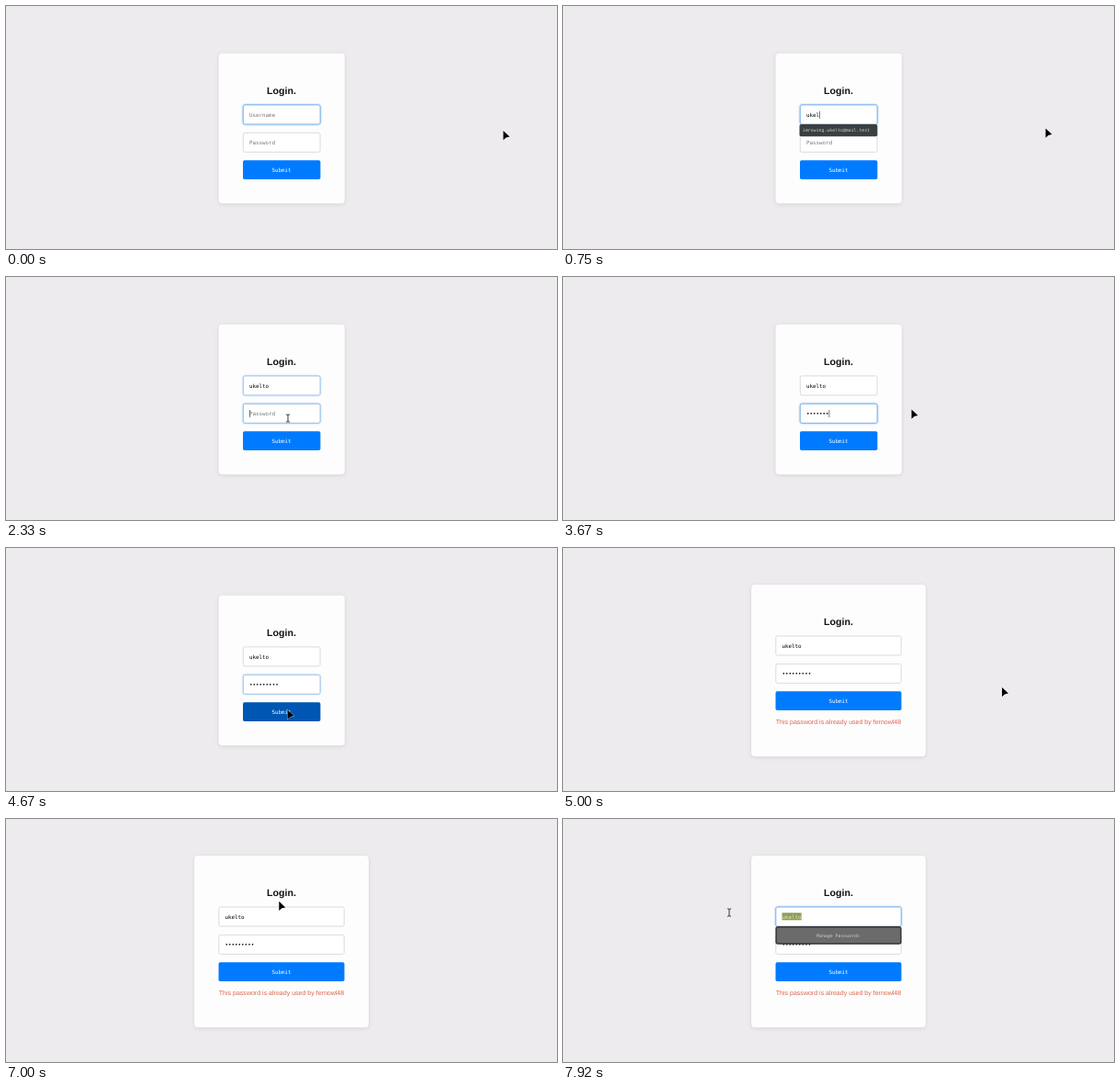
An HTML page for the animation above (8000 ms loop, 600 px wide and 265 px high).

```html
<!DOCTYPE html>
<html lang="en">
<head>
<meta charset="utf-8">
<title>Login</title>
<style>
  html, body { margin: 0; width: 100%; height: 100%; overflow: hidden; background: #edebee; }
  svg { display: block; width: 100vw; height: 100vh; }
  text { font: 5.85px "DejaVu Sans Mono", monospace; text-rendering: geometricPrecision; white-space: pre; }
  .card { fill: #fefdfe; filter: drop-shadow(0 1.6px 2px rgba(0, 0, 0, .1)); }
  .title { font: bold 10.6px "Liberation Sans", sans-serif; fill: #111; }
  .error { font: 7.04px "Liberation Sans", sans-serif; fill: #d9644d; }
  .hint { fill: #777; }
  .small { font-size: 4.87px; }
  .mid { text-anchor: middle; }
</style>
</head>
<body>
<svg id="stage" viewBox="0 0 600 265"></svg>
<script>
const LOOP = 8000, CHAR = 3.52;
const USER = 'ukelto', EMAIL = 'imrowing.ukelto@mail.test';
const ERROR = 'This password is already used by fernowl48';
const USER_START = 200, PASS_START = 2700, KEY_GAP = 150;
const PASS_FOCUS = 2230, SUBMIT = 4590, REJECTED = 4800, DRAG = 7230;

// Pointer stops: time, x, y
const path = [
  [0, 541.5, 136], [250, 541.5, 136], [600, 525.5, 133.5], [1540, 525.5, 133.5],
  [1690, 450, 140], [2050, 307, 154], [2600, 307, 154], [2850, 402, 152],
  [3400, 402, 152], [3550, 379.5, 144.5], [4150, 379.5, 144.5], [4450, 306.5, 176.5],
  [4800, 306.5, 176.5], [5000, 478, 152], [5200, 478, 152], [5750, 365.5, 201.5],
  [6330, 365.5, 201.5], [6600, 340, 166], [6950, 300, 88], [7200, 275, 105],
  [7300, 273, 105], [7650, 181, 102], [LOOP, 181, 102]
];

const clamp = (v, lo = 0, hi = 1) => Math.min(hi, Math.max(lo, v));
const mix = (a, b, k) => a + (b - a) * k;
const mixColor = (a, b, k) => `rgb(${a.map((v, i) => Math.round(mix(v, b[i], k)))})`;
// Rises at `on` and falls at `off`, like a CSS transition
const pulse = (t, on, off, fade = 200) => clamp((t - on) / fade) * (1 - clamp((t - off) / fade));
const typed = (t, start, count) => clamp(Math.floor((t - start) / KEY_GAP) + 1, 0, count);

function pointerAt(t) {
  const i = path.findIndex(stop => stop[0] > t);
  const [t0, x0, y0] = path[i - 1], [t1, x1, y1] = path[i];
  const k = (t - t0) / (t1 - t0), e = k * k * (3 - 2 * k);
  return [mix(x0, x1, e), mix(y0, y1, e)];
}

const rect = (x, y, w, h, r, attrs) =>
  `<rect x="${x}" y="${y}" width="${w}" height="${h}" rx="${r}" ${attrs}/>`;
const label = (x, y, str, cls = '', fill = '') =>
  `<text x="${x}" y="${y}" class="${cls}" ${fill && `fill="${fill}"`}>${str}</text>`;

function field(x, y, w, focus, value, hint) {
  const border = mixColor([206, 210, 218], [110, 168, 222], Math.sqrt(focus));
  const glow = `filter:drop-shadow(0 0 1.3px rgba(0,123,255,${0.55 * focus}))`;
  return rect(x + .3, y + .3, w - .6, 21, 1.8, `fill="#fff" stroke="${border}" stroke-width=".8" style="${glow}"`) +
    label(x + 7, y + 13.1, value || hint, value ? '' : 'hint');
}

function caret(t, x, y, lastKey) {
  return (t - lastKey) % 1060 < 530 ? rect(x, y + 7, .6, 8, 0, 'fill="#222"') : '';
}

function pointer(x, y, beam) {
  const shape = beam
    ? '<path d="M-2-4.2Q0-4.2 0-3Q0-4.2 2-4.2M0-3V3M-2 4.2Q0 4.2 0 3Q0 4.2 2 4.2" fill="none" stroke="#222" stroke-width=".9"/>'
    : '<path d="M0 0V10.2L3 7.4L7 6.6Z" stroke="#fff" stroke-width=".7" stroke-linejoin="round" paint-order="stroke"/>';
  return `<g transform="translate(${x} ${y})">${shape}</g>`;
}

function render(t) {
  const wide = t >= REJECTED;
  const x = wide ? 231.5 : 258, w = wide ? 137 : 84.4, dy = wide ? -11.9 : 0;
  const userY = 107.6 + dy, passY = 138 + dy, buttonY = 168.2 + dy;
  const [px, py] = pointerAt(t);

  const userCount = typed(t, USER_START, USER.length);
  const passCount = typed(t, PASS_START, 9);
  const userFocus = Math.max(pulse(t, -500, PASS_FOCUS), pulse(t, DRAG, LOOP * 2));
  const passFocus = pulse(t, PASS_FOCUS, SUBMIT, 150);
  const hover = Math.max(pulse(t, 4350, 4830, 150), pulse(t, 6560, 6680, 120));

  let out = rect(x - 26.4, 51.8 + dy, w + 52.8, wide ? 187.4 : 163.4, 4, 'class="card"') +
    label(300, 96.3 + dy, 'Login.', 'title mid') +
    field(x, userY, w, userFocus, USER.slice(0, userCount), 'Username') +
    field(x, passY, w, passFocus, '•'.repeat(passCount), 'Password') +
    rect(x, buttonY, w, 20.8, 1.8, `fill="${mixColor([0, 123, 255], [0, 86, 179], hover)}"`) +
    label(300, buttonY + 12.8, 'Submit', 'mid', '#fff');

  if (wide) out += label(300, 192.2, ERROR, 'error mid');

  if (t < PASS_FOCUS) {
    const lastKey = userCount ? USER_START + (userCount - 1) * KEY_GAP : -600;
    out += caret(t, x + 7 + userCount * CHAR, userY, lastKey);
  } else if (t < SUBMIT) {
    const lastKey = passCount ? PASS_START + (passCount - 1) * KEY_GAP : PASS_FOCUS;
    out += caret(t, x + 7 + passCount * CHAR, passY, lastKey);
  }

  if (t > USER_START + 80 && t < PASS_FOCUS - 60) {
    out += rect(x - .5, 129, w + .5, 13.2, 2, 'fill="#3b3f42"') +
      label(261, 137.4, EMAIL, 'small', '#cfcfc4');
  }

  if (t >= DRAG) {
    const end = x + 7 + USER.length * CHAR;
    const picked = clamp(Math.round((end - px) / CHAR), 0, USER.length);
    const from = end - picked * CHAR;
    out += rect(from, userY + 6.6, picked * CHAR, 8, 0, 'fill="#8d9b58"') +
      label(from, userY + 13.1, USER.slice(USER.length - picked), '', '#e6ebc4');
  }
  if (t >= DRAG + 120) {
    out += rect(x + .6, 117.8, w - 1.2, 18.2, 2, 'fill="#6b6b6c" stroke="#343537" stroke-width="1.5"') +
      label(299.5, 129.1, 'Manage Passwords', 'small mid', '#cacaca');
  }

  const inField = y => px > x && px < x + w && py > y && py < y + 21.6;
  out += pointer(px, py, t >= DRAG || inField(userY) || inField(passY));
  stage.innerHTML = out;
}

const stage = document.getElementById('stage');
const start = performance.now();
function tick() {
  render((performance.now() - start) % LOOP);
  requestAnimationFrame(tick);
}
tick();
</script>
</body>
</html>
```
